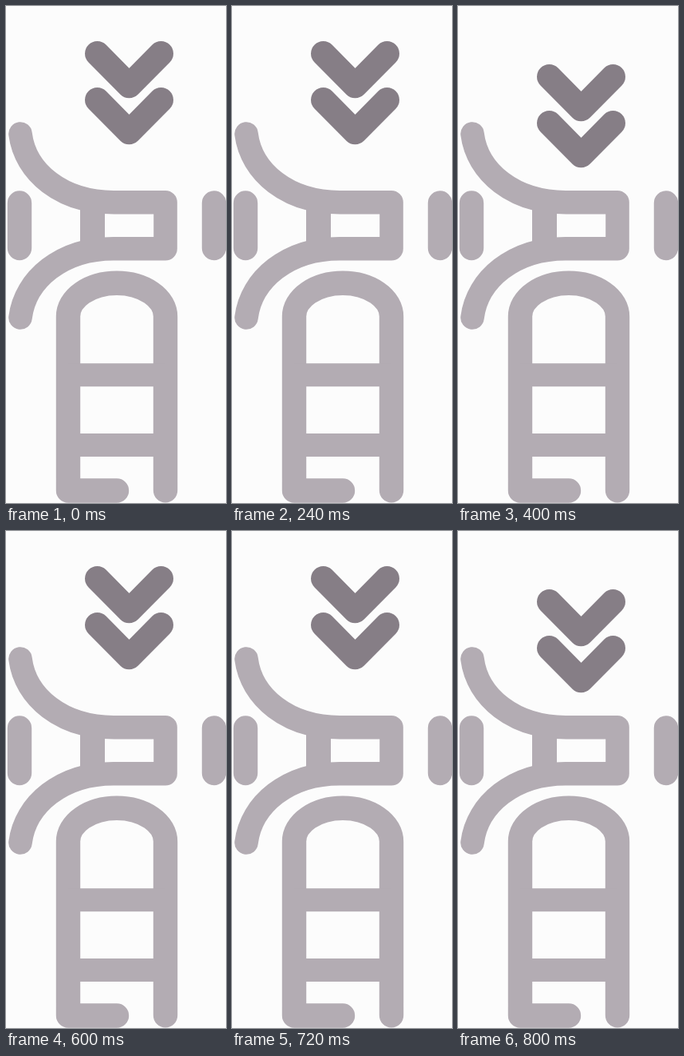
Write an HTML page that moves like this. It is 276 by 622 pixels and loops after 1 s.

```html
<!DOCTYPE html>
<html lang="en">
<head>
<meta charset="utf-8">
<title>Arrows over horn</title>
<style>
  html, body { margin: 0; width: 100%; height: 100%; overflow: hidden; background: #fcfcfc; }
  svg { display: block; width: 276px; height: 622px; }
  path { fill: none; stroke-linecap: round; stroke-linejoin: round; }
  #device { stroke: #b3acb3; stroke-width: 29.6; }
  #device .rung { stroke-width: 29; stroke-linecap: butt; }
  #device .side { stroke-width: 30.4; }
  #arrows { stroke: #867e86; stroke-width: 31; }
</style>
</head>
<body>
<svg viewBox="0 0 276 622">
  <g id="device">
    <path class="side" d="M17 246.5V303M261 246.5V303"/>
    <path d="M18 160C24 208 70 245.7 135 245.7H200V303.7H135C70 303.7 24 342 18 390"/>
    <path class="rung" style="stroke-width:31" d="M108.5 246V304"/>
    <path class="side" d="M200 606.3V388.5A61 41.8 0 0 0 78 388.5V606.5H139"/>
    <path class="rung" d="M78 461.7H200M78 549.5H200"/>
  </g>
  <g id="arrows">
    <path d="M114.5 59.5L154.5 99.8L194.5 59.5M114.5 117.5L154.5 157.8L194.5 117.5"/>
  </g>
</svg>
<script>
  const arrows = document.getElementById('arrows');
  const start = performance.now();

  function draw() {
    const t = (performance.now() - start) % 1000;
    const lowered = (t >= 400 && t < 600) || t >= 800;
    arrows.setAttribute('transform', `translate(0 ${lowered ? 29 : 0})`);
    requestAnimationFrame(draw);
  }
  draw();
</script>
</body>
</html>
```
